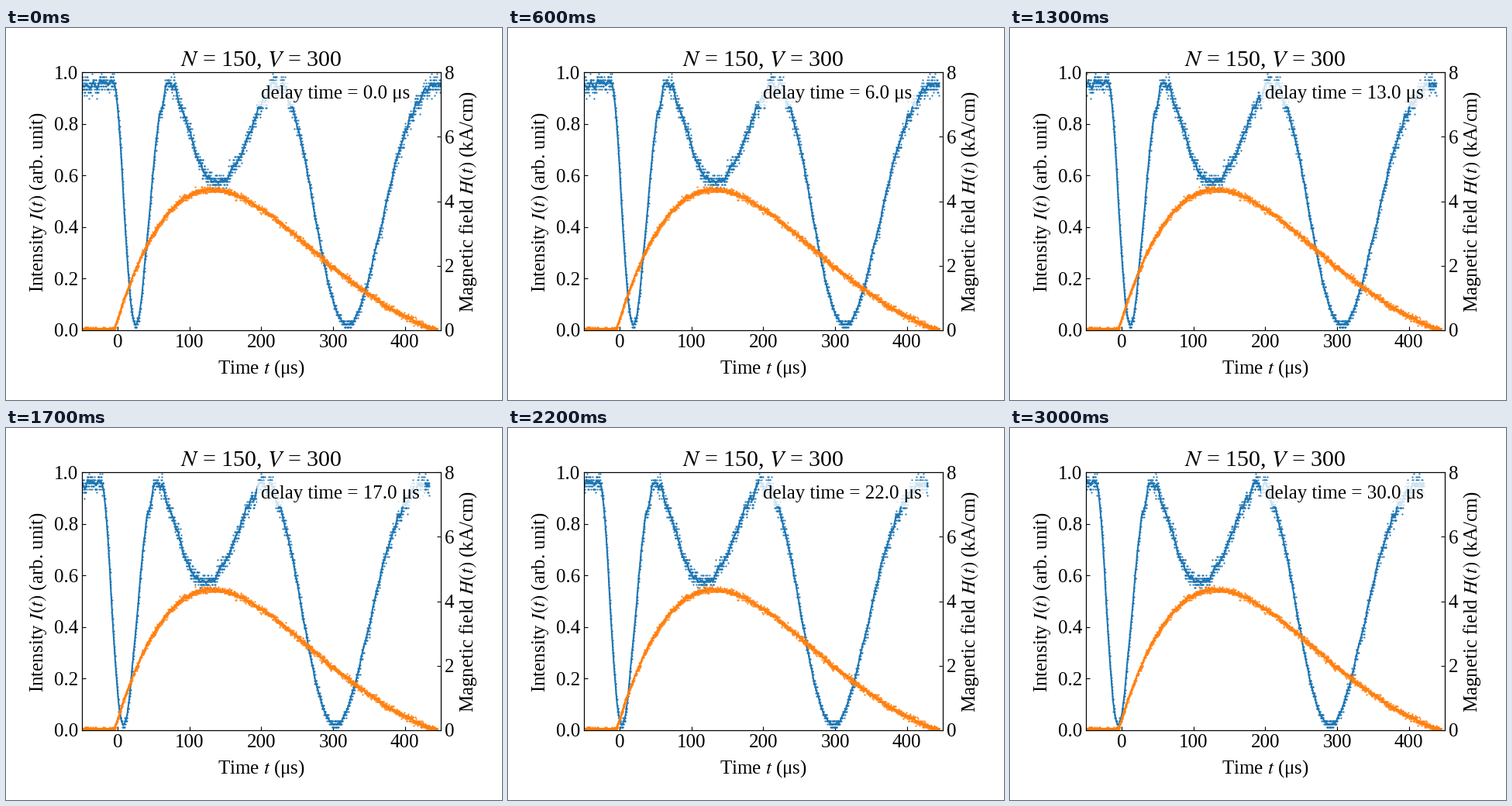
A matplotlib script for the animation above (3100 ms loop, 640 by 480 pixels).

```python
import matplotlib.pyplot as plt
import numpy as np
from matplotlib.animation import FuncAnimation

W, H, DPI = 640, 480, 100
LEFT, RIGHT, TOP, BOTTOM = 98.0, 560.9, 57.3, 390  # axes edges in pixels
FRAMES, INTERVAL = 31, 100
BLUE, ORANGE = "tab:blue", "tab:orange"
STEP = 0.25  # sampling interval in us

plt.rcParams.update({
    "font.family": "Liberation Serif",
    "mathtext.fontset": "stix",
    "font.size": 18,
    "xtick.direction": "in",
    "ytick.direction": "in",
})


def pulse(t, start, length, peak):
    """Damped half sine from start, scaled to 1 at its maximum."""
    w = np.pi / length
    decay = w / np.tan(w * peak)

    def shape(u):
        return np.exp(-decay * u) * np.sin(w * u)

    return np.maximum(shape(np.clip(t - start, 0, length)), 0) / shape(peak)


def field(t):
    return 4.36 * pulse(t, start=-5, length=450, peak=136)


def intensity(t):
    """Interference fringes whose phase follows the field pulse."""
    phase = 7.67 * pulse(t, start=-6, length=456, peak=145) ** 1.02
    return 0.02 + 0.935 * (1 + np.cos(phase)) / 2


def smooth(y, width):
    padded = np.pad(y, width // 2, mode="reflect")
    return np.convolve(padded, np.ones(width) / width, mode="valid")


def quantize(y, step):
    return np.round(y / step) * step


rng = np.random.default_rng(4)

time_i = np.arange(-50, 451.1, STEP)
clean_i = intensity(time_i)
drift = smooth(rng.normal(0, 0.035, time_i.size), 17)
noise_i = (0.008 + 0.011 * clean_i) * rng.normal(size=time_i.size)
dots_i = quantize(np.clip(clean_i * (1 + drift) + noise_i, 0.012, 1), 0.012)
line_i = smooth(dots_i, 13)

time_h = np.arange(-50, 445.1, STEP)
noise_h = rng.normal(0, 0.05, time_h.size)
dots_h = quantize(np.maximum(field(time_h) + noise_h, 0.04), 0.05)
line_h = smooth(dots_h, 21)

fig = plt.figure(figsize=(W / DPI, H / DPI), dpi=DPI, facecolor="white")
ax = fig.add_axes((LEFT / W, 1 - BOTTOM / H,
                   (RIGHT - LEFT) / W, (BOTTOM - TOP) / H))
ax.set(xlim=(-50, 450), ylim=(0, 1), xticks=range(0, 401, 100))
ax.set_title("$N$ = 150, $V$ = 300")
ax_h = ax.twinx()
ax_h.set(ylim=(0, 8), yticks=range(0, 9, 2))


def label(x, y, text, rotation=0):
    fig.text(x / W, 1 - y / H, text, rotation=rotation, ha="center",
             va="baseline", rotation_mode="anchor")


label(329.5, 445.5, "Time $t$ (μs)")
label(47.6, 224.5, "Intensity $I(t)$ (arb. unit)", 90)
label(602.5, 224, "Magnetic field $H(t)$ (kA/cm)", 90)

dot_style = dict(ls="none", marker=".", ms=1.2)
points, = ax.plot(time_i, dots_i, color=BLUE, **dot_style)
curve, = ax.plot(time_i, line_i, color=BLUE, lw=1.5)
ax_h.plot(time_h, dots_h, color=ORANGE, **dot_style)
ax_h.plot(time_h, line_h, color=ORANGE, lw=1.5)

caption = ax.text(200, 0.9, "", zorder=5,
                  bbox=dict(facecolor="white", edgecolor="none", alpha=0.8))


def update(frame):
    delay = float(frame)
    for artist in (points, curve):
        artist.set_xdata(time_i - delay)
    caption.set_text(f"delay time = {delay:.1f} μs")
    return points, curve, caption


anim = FuncAnimation(fig, update, frames=FRAMES, interval=INTERVAL,
                     repeat=True, repeat_delay=0, blit=False)
plt.show()
```
